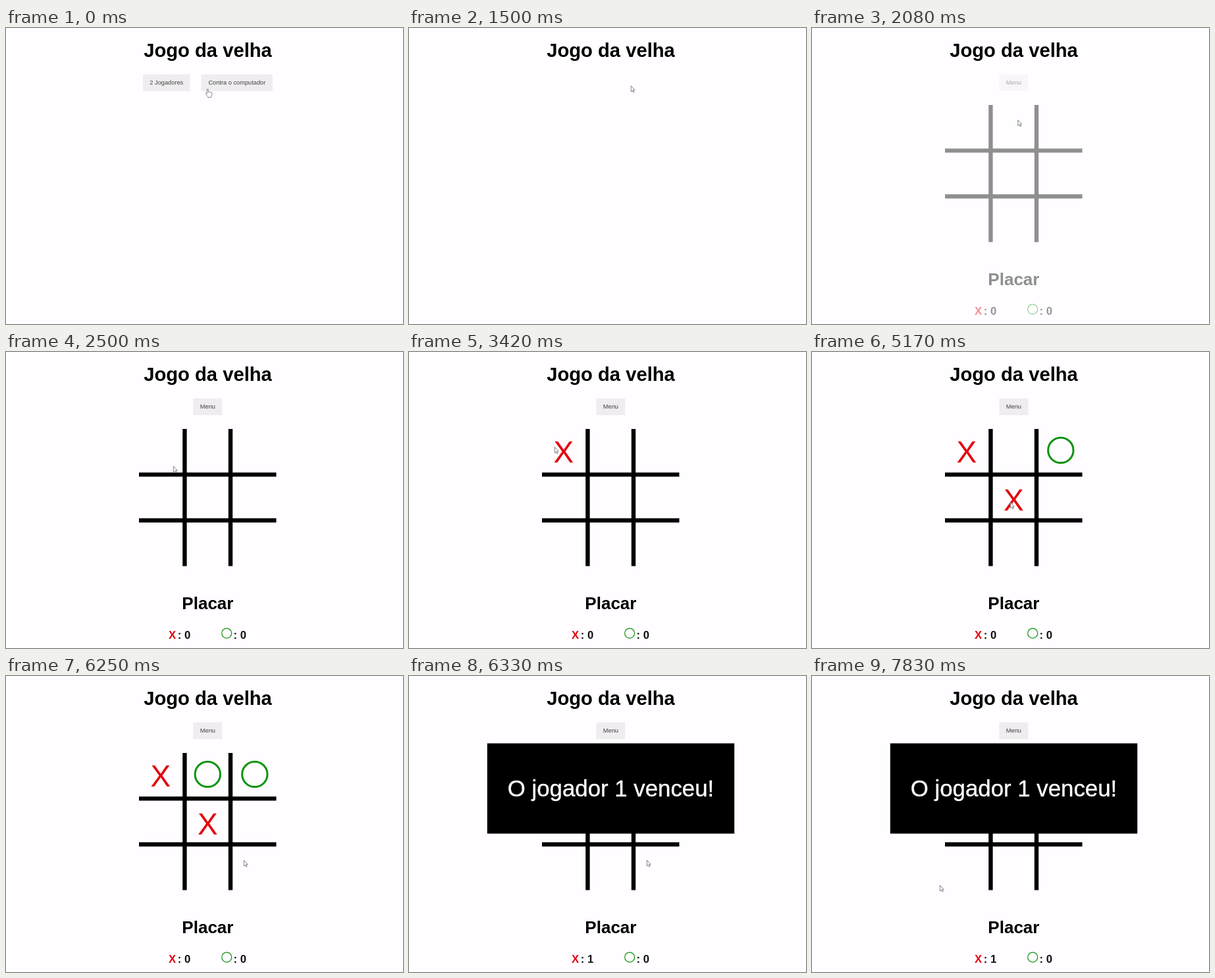
An HTML page that plays this animation: 603x450 px, repeating every 8000 ms.

```html
<!DOCTYPE html>
<html lang="pt-BR">
<head>
<meta charset="utf-8">
<title>Jogo da velha</title>
<style>
  html, body { margin: 0; width: 100%; height: 100%; overflow: hidden; background: #fffdff; }
  svg { display: block; width: 603px; height: 450px; font-family: "Liberation Sans", Arial, sans-serif; }
  h1, .mid, .button text { text-anchor: middle; }
  .bold { font-weight: bold; }
  .button rect { fill: #efedef; }
  .button text { font-size: 9.26px; fill: #444; }
  .x { fill: #e3050f; }
  .o { fill: none; stroke: #0c930c; }
  .grid { stroke: #000; stroke-width: 6.4; }
  .mark { font-size: 46px; stroke-width: 3; }
  .score { font-size: 16.7px; font-weight: bold; fill: #111; }
  #modal text { font-size: 34.8px; fill: #fff; stroke: #fff; stroke-width: .4; }
  #cursor path { fill: #fff; stroke: #666; stroke-width: .8; stroke-linejoin: round; }
</style>
</head>
<body>
<svg viewBox="0 0 603 450">
  <text class="mid bold" x="306.5" y="44.4" font-size="29.2">Jogo da velha</text>

  <g id="menu">
    <g class="button"><rect x="208" y="70.5" width="71.5" height="25.5"/><text x="243.8" y="86.4">2 Jogadores</text></g>
    <g class="button"><rect x="296.5" y="70.5" width="108.5" height="25.5"/><text x="350.9" y="86.4">Contra o computador</text></g>
  </g>

  <g id="game">
    <g class="button"><rect x="284.3" y="70.5" width="44" height="25.5"/><text x="306.4" y="86.4">Menu</text></g>
    <path class="grid" d="M271.4 117V325.5M341 117V325.5M202 186.4H410.5M202 256H410.5"/>
    <g id="marks" class="mark"></g>
    <text class="mid bold" x="306.4" y="391.4" font-size="26">Placar</text>
    <g class="score">
      <text class="x" x="247" y="436">X</text>
      <text x="260.7" y="436">: <tspan id="wins">0</tspan></text>
      <circle class="o" cx="335.2" cy="427.6" r="7.5" stroke-width="1.2"/>
      <text x="345.6" y="436">: 0</text>
    </g>
  </g>

  <g id="modal">
    <rect x="118.8" y="102.4" width="375.4" height="137.2"/>
    <text class="mid" x="306.5" y="183">O jogador 1 venceu!</text>
  </g>

  <g id="cursor">
    <path id="arrow" d="M.4 .5V9.4L2.4 7.6L3.8 10.6L5.1 10L3.8 7.1H6.2Z"/>
    <path id="hand" d="M-.7 7V.9Q-.6 -.3 .3 -.3T1.3 .9V4.4Q2.4 3.6 3.2 4.7Q4.4 4 5.1 5.1Q6.8 4.6 6.8 6.3V8.6Q6.8 10.2 5.7 11.3V12.4H.6V11.4Q-1 9.8 -2.7 7.4Q-3 6 -1.8 6.1Z"/>
  </g>
</svg>

<script>
const LOOP = 8000, FPS = 12, GLIDE = 400, WIN = 6330;
const $ = id => document.getElementById(id);

const plays = [
  { at: 3160, col: 0, row: 0, who: "x" },
  { at: 3580, col: 2, row: 0, who: "o" },
  { at: 5080, col: 1, row: 1, who: "x" },
  { at: 5330, col: 1, row: 0, who: "o" }
];

// Each glide: start time and the place the pointer moves to.
const home = { x: 306, y: 93 };
const glides = [
  { at: 180, x: 337, y: 87 },
  { at: 1480, x: 313, y: 139 },
  { at: 2060, x: 254, y: 173 },
  { at: 2580, x: 221, y: 144 },
  { at: 3800, x: 237, y: 282 },
  { at: 4640, x: 301, y: 228 },
  { at: 5180, x: 275, y: 307 },
  { at: 5560, x: 361, y: 279.5 },
  { at: 6420, x: 202, y: 321 },
  { at: 7420, x: 194, y: 317.5 }
];

const ramp = (t, from, length) => Math.max(0, Math.min(1, (t - from) / length));
const ease = k => k * k * (3 - 2 * k);

function pointerAt(t) {
  return glides.reduce((p, g) => {
    const k = ease(ramp(t, g.at, GLIDE));
    return { x: p.x + (g.x - p.x) * k, y: p.y + (g.y - p.y) * k };
  }, home);
}

function addMark({ col, row, who }) {
  const x = 234.8 + 71.5 * col, y = 149.4 + 73 * row;
  const mark = document.createElementNS("http://www.w3.org/2000/svg", who === "x" ? "text" : "circle");
  const attrs = who === "x"
    ? { class: "x mid", x, y: y + 18.6 }
    : { class: "o", cx: x, cy: y, r: 19.2 };
  for (const name in attrs) mark.setAttribute(name, attrs[name]);
  if (who === "x") mark.textContent = "X";
  return $("marks").appendChild(mark);
}

function fade(el, alpha) {
  el.style.display = alpha > 0 ? "" : "none";
  el.style.opacity = +alpha;
}

const marks = plays.map(addMark);

function draw(ms) {
  // The picture advances in 12 steps per second.
  const t = Math.floor((ms + 7) * FPS / 1000) * 1000 / FPS;
  const won = t >= WIN;

  fade($("menu"), 1 - ramp(t, 670, 330));
  fade($("game"), ramp(t, 1920, 380));
  marks.forEach((mark, i) => fade(mark, t >= plays[i].at && !won));
  fade($("modal"), won);
  $("wins").textContent = won ? 1 : 0;

  const p = pointerAt(t);
  fade($("hand"), t < 990);
  fade($("arrow"), t >= 990);
  $("cursor").setAttribute("transform", `translate(${p.x} ${p.y})`);
}

const start = performance.now();
function tick() {
  draw((performance.now() - start) % LOOP);
  requestAnimationFrame(tick);
}
tick();
</script>
</body>
</html>
```
